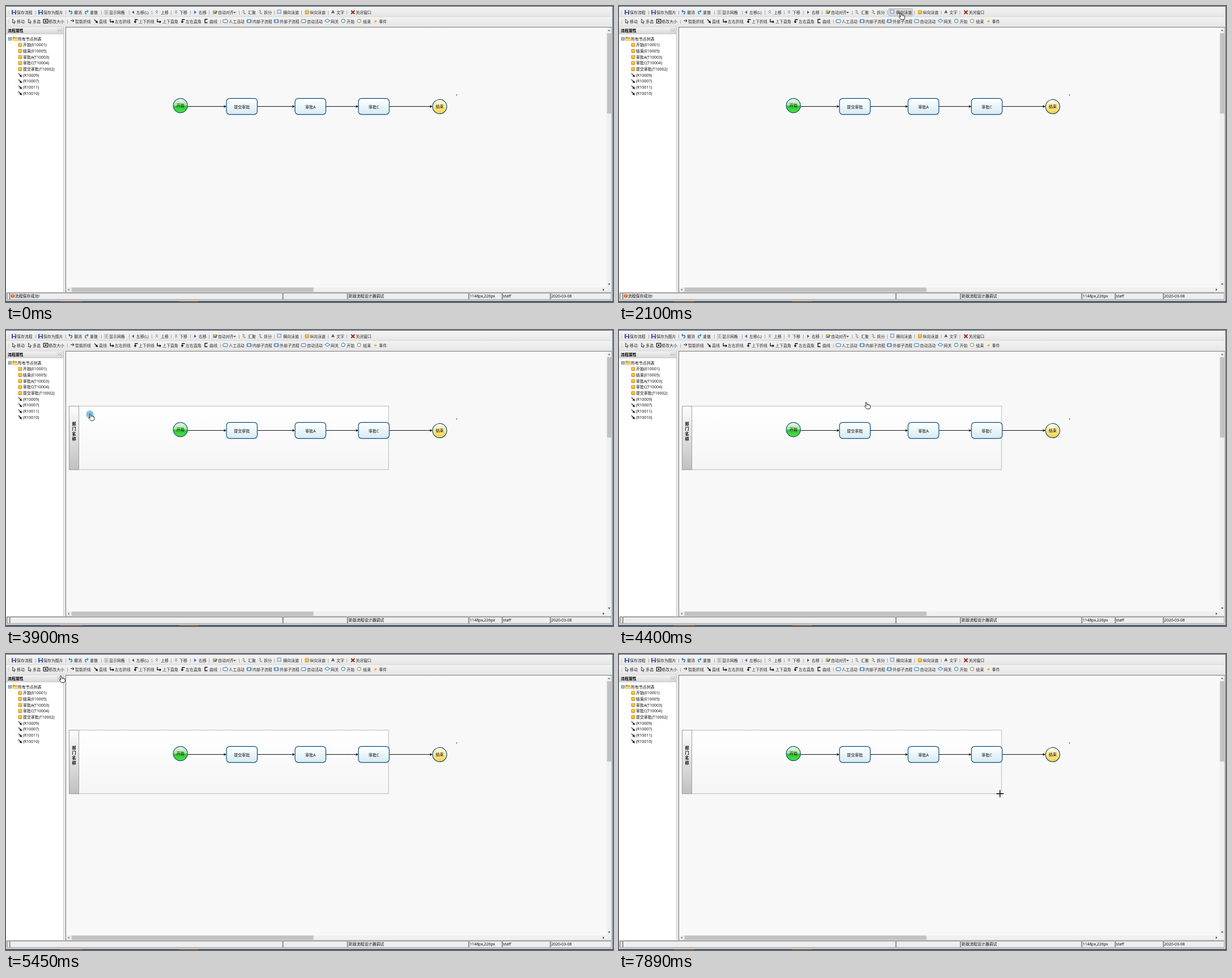
Animation of 1071x523 px, one loop 8 s. Source, as an HTML page:

```html
<!DOCTYPE html>
<html lang="zh-CN">
<head>
<meta charset="utf-8">
<title>流程设计器</title>
<style>
html, body { margin: 0; width: 100%; height: 100%; overflow: hidden; background: #e9e9e9; }
svg { display: block; }
text { font: 6.95px "Open Sans", "Noto Sans CJK SC", "Noto Sans CJK", sans-serif; fill: #000; white-space: pre; }
#tools text { fill: #2a2a2a; }
.bold { font-weight: 700; }
.mid { text-anchor: middle; }
</style>
</head>
<body>
<svg id="stage" width="1071" height="523" viewBox="0 0 1071 523">
  <defs id="defs"></defs>
  <g id="base"></g>
  <g id="lane"></g>
  <g id="nodes"></g>
  <rect id="hover" height="13" rx="1" fill="#d9d9d9" stroke="#aaa" stroke-width=".8"/>
  <g id="tools"></g>
  <g id="message"></g>
  <circle id="pulse" cx="148" cy="149" r="6.7" fill="#6bb7e6" opacity=".85"/>
  <g id="hand">
    <path d="M-3.6-5.2Q-3.4-6.2-2.4-6Q-1.7-5.8-1.4-4.7L-.6-1.8Q.6-2.9 1.5-1.7Q2.7-2.4 3.3-1.1Q4.6-1.3 4.8.1L5 2.6Q5 4.4 3.7 5.8L-1.1 6.2Q-2.6 4.5-4.6 2.3Q-5.5.9-4.4.5Q-3.5.4-2.5 1.5Z"
      fill="#fff" stroke="#111" stroke-width=".95"/>
    <path d="M-.5-1.6l.5 2M1.6-1.5l.3 1.8M3.3-.9l.2 1.4" stroke="#333" stroke-width=".6"/>
  </g>
  <path id="cross" d="M-6.5 0H6.5M0-6.5V6.5" stroke="#000" stroke-width="1.4"/>
</svg>
<script>
const $ = id => document.getElementById(id);
const add = (id, html) => $(id).insertAdjacentHTML('beforeend', html);
const rect = (x, y, w, h, fill, extra = '') =>
  `<rect x="${x}" y="${y}" width="${w}" height="${h}" fill="${fill}" ${extra}/>`;
const text = (x, cy, s, cls = '') => `<text x="${x}" y="${cy + 2.6}" class="${cls}">${s}</text>`;
const line = (d, color, width = 1, extra = '') =>
  `<path d="${d}" fill="none" stroke="${color}" stroke-width="${width}" ${extra}/>`;
const shape = (d, fill) => `<path d="${d}" fill="${fill}"/>`;

const gradients = {
  bar: ['#f3f3f3', '#e6e6e6'], head: ['#f4f4f4', '#d5d5d5'], box: ['#ffffff', '#d6ebf2'],
  pool: ['#ffffff', '#f5f5f5'], title: ['#fdfdfd', '#c0c0c0'], end: ['#fffdf0', '#ffd13a']
};
for (const [id, [a, b]] of Object.entries(gradients))
  add('defs', `<linearGradient id="${id}" x2="0" y2="1"><stop stop-color="${a}"/><stop offset="1" stop-color="${b}"/></linearGradient>`);
add('defs', `<linearGradient id="start" x2="0" y2="1"><stop stop-color="#f2fcf0"/><stop offset=".5" stop-color="#9fe39a"/>
  <stop offset=".52" stop-color="#2fc52f"/><stop offset="1" stop-color="#4fe04a"/></linearGradient>`);

// Icons live in an 8 by 8 box centred on the origin.
const square = rect(-3, -3, 5.8, 6, '#fbc02a', 'rx=".6" stroke="#a8780e" stroke-width=".8"') + line('M-2-2H1.5', '#ffe48e', .9);
const slant = line('M-3-3L2 2', '#111', 1.2) + shape('M3 3.4L-1.4 2L2-1.2Z', '#111');
const blueBox = rect(-4, -3, 8, 5.5, '#eef6fc', 'rx="1.2" stroke="#2c6ca8" stroke-width="1"');
const subBox = blueBox + line('M-2.4-3V2.5M2.4-3V2.5', '#2c6ca8', .9);
const pointer = line('M-2.5-4V3L-.8 1.5L.5 4.3L1.6 3.7L.5 1.2H2.8Z', '#222', .8);
const ring = color => `<circle cy="-.7" r="3.2" fill="#f6faf3" stroke="${color}"/>`;
const fork = line('M-3-3H0V2.5H3', '#777', 1) + line('M-2-1V2', '#d0a030', .8);
const icons = {
  save: rect(-4, -4, 8, 8, '#3d4f9b') + rect(-2, -3.6, 4.4, 3, '#fff') + rect(-2, 1, 4, 3, '#cfd6ee'),
  undo: line('M-2.5-1.5H1Q3-1 2 2L0 3.5', '#2f76c0', 1.6) + shape('M-4-2L-1-4.5V1Z', '#2f76c0'),
  redo: line('M2.5-1.5H-1Q-3-1-2 2L0 3.5', '#2f8fc0', 1.6) + shape('M4-2L1-4.5V1Z', '#2f8fc0'),
  grid: line('M-4-3H4M-4 0H4M-4 3H4M0-3V3', '#888', .8),
  left: shape('M-2 0L2-3V3Z', '#3468bd'),
  right: shape('M2 0L-2-3V3Z', '#3468bd'),
  up: line('M-2-1L0-3L2-1M-2 2L0 0L2 2', '#4b6da4'),
  down: line('M-2-3L0-1L2-3M-2 0L0 2L2 0', '#4b6da4'),
  align: rect(-3.5, -2.8, 6, 5.5, '#edc53f', 'stroke="#777" stroke-width=".6"') + line('M-2 0L0 2L4-2', '#315da0', 1.3),
  fork, square, slant, blueBox, subBox, pointer,
  pool: rect(-3, -4, 6, 6, '#dfeafa', 'stroke="#6688c4" stroke-width="1"'),
  letter: '<text x="-2.7" y="2" style="font-weight:700;font-size:7.5px">A</text>',
  close: line('M-3-3L3 3M3-3L-3 3', '#9c2e1e', 2.2),
  resize: rect(-3.7, -3.5, 7.5, 6.5, '#fff', 'stroke="#111" stroke-width="1.2"') + rect(-1.5, -1.5, 3, 2.5, '#111'),
  arrow: line('M-3-1H3M.5-3.5L3-1L.5 1.5', '#111'),
  elbowR: line('M-3-4V1H2', '#111', 1.3) + shape('M1-1.7L4 1L1 3.5Z', '#111'),
  elbowL: line('M3.5-3H-1V1', '#111', 1.3) + shape('M-3.5 0H1.5L-1 3.6Z', '#111'),
  curve: line('M2.5-3.5H-2V2.5H2.5', '#111', 1.3),
  gate: '<path d="M-4.5-1L0-4L4.5-1L0 2Z" fill="#eef6fc" stroke="#2c6ca8"/>',
  start: ring('#28708e'), end: ring('#7f8544'),
  event: shape('M2-4L-3 1H0L-2 4L3-1H0Z', '#f0a022')
};
const icon = (name, x, y) => `<g transform="translate(${x} ${y})">${icons[name]}</g>`;

// Each tool: icon, icon left edge, label left edge, label.
const rows = [
  { y: 11, seps: [52, 105, 168, 217, 257, 291, 325, 358, 411, 473, 521, 568, 601], tools: [
    ['save', 10, 19, '保存流程'], ['save', 57, 66, '保存为图片'], ['undo', 110, 120, '撤消'], ['redo', 138, 148, '重做'],
    ['grid', 173, 182, '显示网格'], ['left', 220, 230, '左移(L)'], ['up', 262, 273, '上移'], ['down', 296, 306, '下移'],
    ['right', 330, 340, '右移'], ['align', 365, 374, '自动对齐'], ['fork', 416, 427, '汇聚'], ['fork', 445, 455, '拆分'],
    ['pool', 478, 489, '横向泳道'], ['square', 527, 536, '纵向泳道'], ['letter', 573, 583, '文字'], ['close', 608, 617, '关闭窗口']] },
  { y: 27, seps: [108, 378], tools: [
    ['pointer', 10, 19, '移动'], ['pointer', 38, 47, '多选'], ['resize', 66, 75, '修改大小'], ['arrow', 113, 122, '智能折线'],
    ['slant', 155, 164, '直线'], ['elbowR', 183, 192, '左右折线'], ['elbowL', 225, 234, '上下折线'], ['elbowR', 266, 276, '上下直角'],
    ['elbowL', 308, 317, '左右直角'], ['curve', 349, 359, '曲线'], ['blueBox', 383, 393, '人工活动'], ['subBox', 425, 435, '内部子流程'],
    ['subBox', 473, 483, '外部子流程'], ['blueBox', 521, 531, '自动活动'], ['gate', 563, 573, '网关'], ['start', 591, 601, '开始'],
    ['end', 619, 630, '结束'], ['event', 648, 658, '事件']] }
];
const buttons = [];
add('base', rect(0, 0, 1071, 523, '#e9e9e9') + rect(0, 2, 1068, 17, 'url(#bar)') + rect(0, 19, 1068, 17, 'url(#bar)') +
  rect(0, 1, 1070, 1, '#e4e6e9') + rect(0, 18.5, 1068, .7, '#d0d0d0'));
for (const { y, seps, tools } of rows) {
  add('tools', line(`M5 ${y - 3}V${y + 4}`, '#aaa', 1, 'stroke-dasharray="1 1"'));
  for (const x of seps) add('tools', line(`M${x + .5} ${y - 3}V${y + 4}`, '#a8a8a8'));
  for (const [name, x, tx, label] of tools) {
    add('tools', icon(name, x + 4, y) + text(tx, y + .3, label));
    buttons.push({ x: x - 2, y: y - 6.5, w: tx - x + label.length * 7 + 3 });
  }
}
add('tools', shape('M401.5 10.5H405.5L403.5 13Z', '#333'));

// Side panel
add('base', rect(0, 37, 101, 13, 'url(#head)', 'stroke="#c4c4c4" stroke-width=".6"') + text(3, 43.7, '流程属性', 'bold') +
  rect(91, 40, 7.5, 7.5, '#f7f7f7', 'stroke="#b5b5b5" stroke-width=".7"') +
  line('M94.3 41.8L92.5 43.8L94.3 45.8M97.3 41.8L95.5 43.8L97.3 45.8', '#555', .8) +
  rect(0, 50, 101, 455, '#fff') + rect(101, 37, 1, 468, '#c8c8c8') +
  rect(4.5, 55.5, 5, 5, '#dcebfa', 'stroke="#4678a8" stroke-width=".9"') + line('M5.5 58H8.5', '#234') +
  shape('M11.5 54.5H15L16 55.5H20V61.5H11.5Z', '#cf9420') + shape('M13 57.3H21L19.5 61.5H11.5Z', '#ffd766') +
  text(21, 58, '所有节点列表'));
['开始(E10001)', '结束(E10005)', '审批A(T10003)', '审批C(T10004)', '提交审批(T10002)', '(R10009)', '(R10007)', '(R10011)', '(R10010)']
  .forEach((label, i) => {
    const y = 68.8 + i * 10.68;
    add('base', line(`M16 ${y}H20`, '#ddd', .6, 'stroke-dasharray="1 1"') + icon(i < 5 ? 'square' : 'slant', 25, y) + text(30, y, label));
  });

// Canvas with scrollbars
add('base', rect(105.5, 37.5, 963, 468.5, '#f8f8f8', 'stroke="#777"') +
  rect(1059.5, 38, 9, 459, '#f0f0f0') + rect(106, 497, 962.5, 8.5, '#f0f0f0') +
  rect(1060.5, 48, 7.5, 142, '#c2c2c2') + rect(115.5, 497.5, 427, 7.5, '#c2c2c2') +
  shape('M1062 44.2H1066.6L1064.3 41.6Z', '#777') + shape('M1062 490.5H1066.6L1064.3 493Z', '#444') +
  shape('M111.5 499V503.4L109 501.2Z', '#777') + shape('M1053 499V503.4L1055.6 501.2Z', '#444'));

// Status bar
add('base', rect(0, 506, 1069, 15, '#dedede') + rect(0, 521, 1071, 2, '#4d6077') + rect(96, 521.5, 38, 1.5, '#93705d') + rect(306, 521.5, 34, 1.5, '#93705d'));
const cells = [2, 7, 489, 603, 817, 876, 961, 1069];
cells.slice(0, -1).forEach((x, i) => {
  const right = cells[i + 1] - 1;
  add('base', rect(x, 507, right - x, 12, '#efeeee') + line(`M${x} 518.7V507H${right}`, '#666') + line(`M${x} 518.5H${right}V507`, '#999'));
});
add('base', text(604.5, 512.7, '新版流程设计器调试') + text(818, 512.7, '1148px,226px') + text(877, 512.7, 'staff') + text(962, 512.7, '2020-03-08'));
add('message', `<circle cx="12" cy="512.3" r="3.4" fill="#d5622b"/>` + line('M12 510V512.7M12 513.5V514.5', '#fff', 1) + text(15.7, 512.7, '流程保存成功!'));

// Window edge
add('base', rect(0, 0, 1071, 1, '#48637f') + rect(1070, 0, 1, 521, '#48637f'));

// Swimlane
add('lane', rect(111.5, 134.5, 563.5, 112.3, 'url(#pool)', 'stroke="#b4b4b4" stroke-width=".9"') +
  rect(111.5, 134.5, 17, 112.3, 'url(#title)', 'stroke="#999" stroke-width=".9"') +
  [...'部门名称'].map((c, i) => text(120, 165.2 + i * 9, c, 'bold mid')).join(''));

// Flow chart
for (const [a, b] of [[320.5, 389], [443.5, 510], [564.5, 622], [676.5, 752.5]])
  add('nodes', line(`M${a} 177.5H${b - 1}`, '#111', 1.2) + shape(`M${b} 177.5l-5-2.6l1.3 2.6l-1.3 2.6Z`, '#111'));
for (const [x, label] of [[389, '提交审批'], [510, '审批A'], [621.8, '审批C']])
  add('nodes', rect(x, 163.4, 54.4, 28.2, 'url(#box)', 'rx="5.5" stroke="#0b4d80" stroke-width="1.2"') + text(x + 27.2, 177.9, label, 'mid'));
for (const [x, y, fill, label, ty] of [[307.7, 176, 'start', '开始', 175.5], [765.2, 177.8, 'end', '结束', 177.5]])
  add('nodes', `<circle cx="${x}" cy="${y}" r="12.6" fill="url(#${fill})" stroke="#17547f" stroke-width="1.2"/>` + text(x, ty, label, 'mid'));
add('nodes', `<circle cx="795" cy="157.3" r="1.1" fill="#2c7fa8"/>`);

// Pointer path: time, x, y
const path = [
  [500, 412, 34], [950, 517, 16], [1230, 499, 18], [2100, 499, 18], [2250, 522, 31], [2600, 300, 110], [2870, 189, 157],
  [2960, 160, 141], [3100, 154, 133], [3380, 150.5, 154], [3900, 150.5, 154], [4150, 260, 160], [4680, 637, 104],
  [4900, 458.7, 76], [5300, 115, 58], [5500, 94, 40], [5560, 85, 37], [6080, 85, 37], [6380, 500.7, 128.3],
  [6850, 681, 230.5], [7060, 674, 242.5], [7300, 674, 242.5], [7360, 674, 243.5], [7540, 674, 243.5], [7890, 672.3, 246.7]
];
function pointerAt(t) {
  const i = path.findIndex(p => p[0] > t);
  if (i < 0) return path.at(-1).slice(1);
  if (i === 0) return path[0].slice(1);
  const [t0, x0, y0] = path[i - 1], [t1, x1, y1] = path[i], k = (t - t0) / (t1 - t0);
  return [x0 + (x1 - x0) * k, y0 + (y1 - y0) * k];
}
const show = (id, on) => $(id).style.display = on ? '' : 'none';

function draw(now) {
  const t = now % 8000, [x, y] = pointerAt(t), visible = t >= 500;
  const drawing = t > 6080 && x > 106 && y > 38;
  for (const id of ['hand', 'cross']) $(id).setAttribute('transform', `translate(${x} ${y})`);
  show('hand', visible && !drawing);
  show('cross', drawing);
  show('lane', t >= 3900);
  show('message', t < 3900);
  show('pulse', t >= 3900 && t < 3950);
  const tipX = x - 3, tipY = y - 6;
  const hot = visible && buttons.find(b => tipX >= b.x && tipX <= b.x + b.w && tipY >= b.y && tipY <= b.y + 13);
  show('hover', hot);
  if (hot) {
    $('hover').setAttribute('x', hot.x);
    $('hover').setAttribute('y', hot.y);
    $('hover').setAttribute('width', hot.w);
  }
  requestAnimationFrame(draw);
}
requestAnimationFrame(draw);
</script>
</body>
</html>
```
